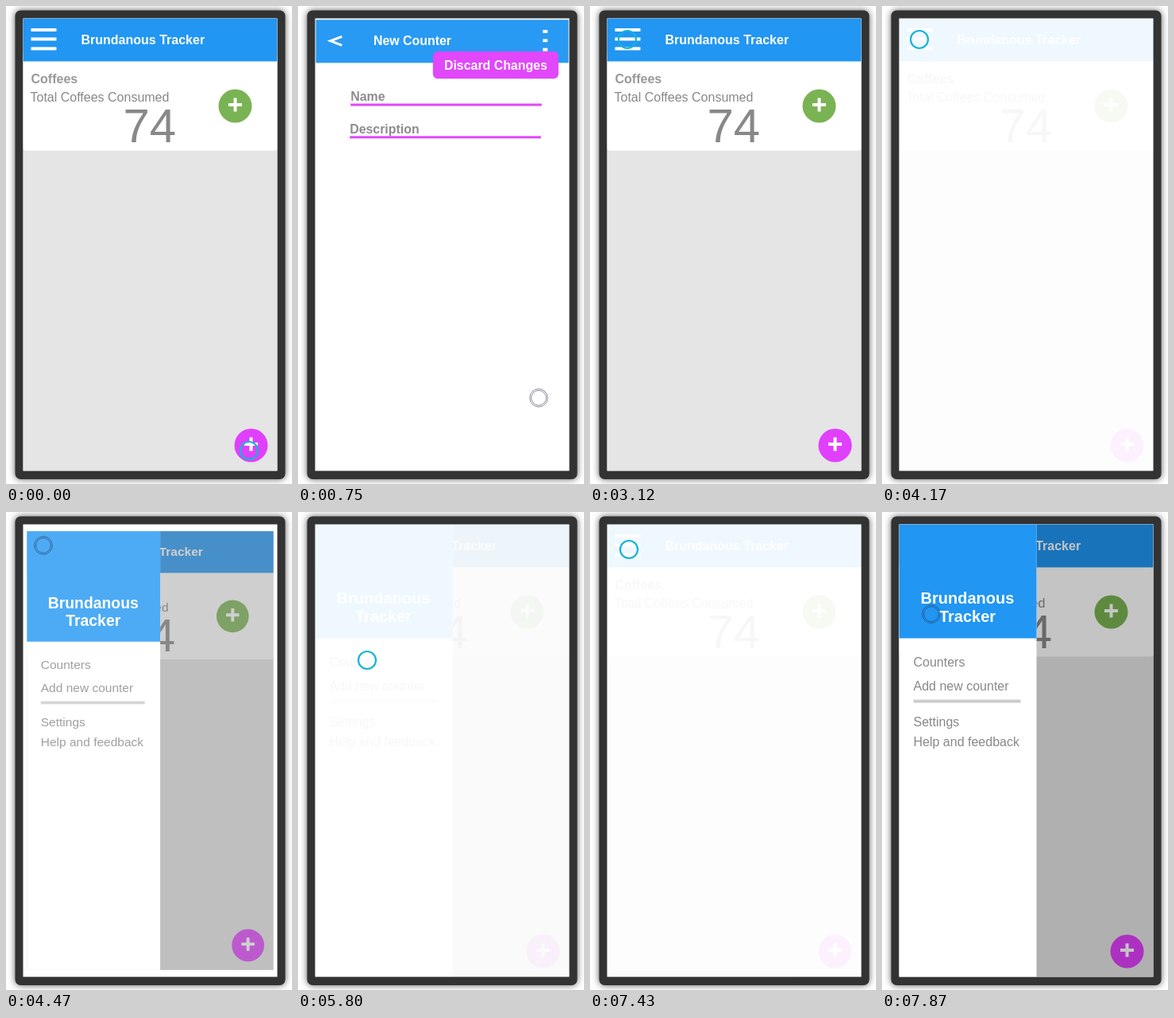
These frames come from a looping animation (360 by 600 pixels, 8 s). An HTML page:

```html
<!DOCTYPE html>
<html lang="en">
<head>
<meta charset="utf-8">
<title>Counter app</title>
<style>
  html, body { margin: 0; width: 100%; height: 100%; overflow: hidden; background: #fff; }
  svg { display: block; width: 360px; height: 600px; font: 16px "Liberation Sans", Arial, sans-serif; }
  .bold { font-weight: bold; }
  .white { fill: #fff; }
  .grey { fill: #888; }
  .bezel { fill: #333; filter: drop-shadow(0 0 4px rgba(0, 0, 0, .65)); }
</style>
</head>
<body>
<svg viewBox="0 0 360 600">
  <defs>
    <clipPath id="glass"><rect x="21.5" y="15.5" width="320" height="568"/></clipPath>
    <path id="plus" d="M-8.5 0H8.5M0 -8.5V8.5" stroke="#fff" stroke-width="4"/>
    <g id="homeView">
      <rect x="21.5" y="15.5" width="320" height="568" fill="#e5e5e5"/>
      <rect class="white" x="21.5" y="60" width="320" height="121.5" rx="3"/>
      <rect x="21.5" y="15.5" width="320" height="54" fill="#2196f3"/>
      <path d="M31.5 30H63.5M31.5 41.5H63.5M31.5 53.5H63.5" stroke="#fff" stroke-width="4"/>
      <text class="bold white" x="94.5" y="47.5">Brundanous Tracker</text>
      <text class="bold" x="31.5" y="97" fill="#999">Coffees</text>
      <text class="grey" x="30.5" y="119.7">Total Coffees Consumed</text>
      <text class="grey" x="147.5" y="171" font-size="60">74</text>
      <circle cx="288.5" cy="125.5" r="21" fill="#7ab353"/>
      <use href="#plus" x="288.5" y="124"/>
      <circle cx="308.5" cy="551.5" r="21" fill="#e040fb"/>
      <use href="#plus" x="308.5" y="550"/>
    </g>
  </defs>

  <rect class="bezel" x="11.5" y="5.5" width="340" height="588.5" rx="7"/>
  <rect class="white" x="21.5" y="15.5" width="320" height="568"/>

  <g clip-path="url(#glass)">
    <g id="home"><use href="#homeView"/></g>

    <g id="editor">
      <rect x="21.5" y="15.5" width="320" height="54.5" fill="#2196f3"/>
      <path d="M54.5 36.8L40 42.3L54.5 47.8" fill="none" stroke="#fff" stroke-width="3"/>
      <text class="bold white" x="94.5" y="47.8">New Counter</text>
      <path d="M312 28.3V56" stroke="#fff" stroke-width="6" stroke-dasharray="4 7.5"/>
      <rect x="169.8" y="55.5" width="159" height="34.5" rx="6" fill="#e040fb"/>
      <text class="bold white" x="184" y="78.8">Discard Changes</text>
      <text class="bold grey" x="65.5" y="117.8">Name</text>
      <text class="bold grey" x="64.5" y="158.8">Description</text>
      <path d="M65.5 123H307.5M64.5 164H306.5" stroke="#e040fb" stroke-width="3"/>
    </g>

    <g id="drawer">
      <use href="#homeView"/>
      <rect x="21.5" y="15.5" width="320" height="568" opacity=".23"/>
      <rect class="white" x="21.5" y="15.5" width="173" height="568"/>
      <rect x="21.5" y="15.5" width="173" height="143" fill="#2196f3"/>
      <g class="bold white" font-size="20" text-anchor="middle">
        <text x="107.5" y="115">Brundanous</text>
        <text x="107.5" y="138">Tracker</text>
      </g>
      <g class="grey">
        <text x="39.5" y="193.5">Counters</text>
        <text x="39.5" y="223.5">Add new counter</text>
        <text x="39.5" y="268.5">Settings</text>
        <text x="39.5" y="293.5">Help and feedback</text>
      </g>
      <path d="M39.5 237.5H174.5" stroke="#ccc" stroke-width="4"/>
    </g>

    <g id="cursor" fill="none">
      <circle id="pressed" r="11" stroke="#12b5d3" stroke-width="2.2"/>
      <g id="idle" stroke="#28324a" stroke-opacity=".55">
        <circle r="11.3"/><circle r="9.4"/>
      </g>
    </g>
  </g>
</svg>
<script>
  const LOOP = 8000, STEP = 146.7, CENTER = [181.5, 299.5];
  const $ = id => document.getElementById(id);
  const clamp = v => Math.min(1, Math.max(0, v));

  // Bursts of stepped motion; the picture rests after each one.
  const bursts = [
    { at: 450, steps: 5 }, { at: 1340, steps: 3 }, { at: 2670, steps: 4 },
    { at: 4170, steps: 7 }, { at: 5800, steps: 7 }, { at: 7430, steps: 4 }
  ];
  const changes = [
    { at: 450, from: 'home', to: 'editor', lag: -26 },
    { at: 2670, from: 'editor', to: 'home', lag: 30 },
    { at: 4170, from: 'home', to: 'drawer', lag: 73 },
    { at: 5800, from: 'drawer', to: 'home', lag: 50 },
    { at: 7430, from: 'home', to: 'drawer', lag: 30 }
  ];
  // Each move is a quadratic curve: start, bend, end.
  const moves = [
    { at: 450, time: 980, path: [[306, 558], [306, 244], [47, 42]] },
    { at: 4470, time: 575, path: [[47, 42], [47, 114], [87, 186]] },
    { at: 6100, time: 575, path: [[87, 186], [87, 116], [49, 47]] },
    { at: 7430, time: 830, path: [[49, 47], [49, 116], [87, 186]] }
  ];
  const idleSpans = [[500, 1600], [2700, 3100], [4200, 5000], [5850, 6600], [7480, LOOP]];

  const latest = (list, t) => list.filter(item => item.at <= t).pop();
  const easeInOut = u => u < .5 ? 4 * u ** 3 : 1 - 4 * (1 - u) ** 3;
  const easeOut = u => 1 - (1 - u) ** 2;

  function sampleTime(t) {
    const burst = latest(bursts, t);
    if (!burst) return 0;
    const n = Math.floor((t - burst.at + 3) / STEP);
    return burst.at + Math.min(n, burst.steps - 1) * STEP;
  }

  function showScreen(id, opacity, scale) {
    for (const name of ['home', 'editor', 'drawer'])
      $(name).style.display = name === id ? '' : 'none';
    const [x, y] = CENTER;
    $(id).setAttribute('opacity', opacity);
    $(id).setAttribute('transform', `translate(${x} ${y}) scale(${scale}) translate(${-x} ${-y})`);
  }

  function drawScreen(t) {
    const change = latest(changes, t);
    if (!change) return showScreen('home', 1, 1);
    const age = t - change.at;
    if (age < STEP / 2) return showScreen(change.from, .07, 1);
    const q = easeOut(clamp((age - change.lag) / 400));
    showScreen(change.to, q, .85 + .15 * q);
  }

  function drawCursor(t) {
    const { at, time, path: [a, b, c] } = latest(moves, t) || moves[0];
    const s = easeInOut(clamp((t - at) / time));
    const [x, y] = [0, 1].map(i => (1 - s) ** 2 * a[i] + 2 * s * (1 - s) * b[i] + s * s * c[i]);
    const idle = idleSpans.some(([start, end]) => t > start && t < end);
    $('cursor').setAttribute('transform', `translate(${x} ${y})`);
    $('idle').style.display = idle ? '' : 'none';
    $('pressed').style.display = idle ? 'none' : '';
  }

  function draw() {
    const t = sampleTime(performance.now() % LOOP);
    drawScreen(t);
    drawCursor(t);
    requestAnimationFrame(draw);
  }
  draw();
</script>
</body>
</html>
```
